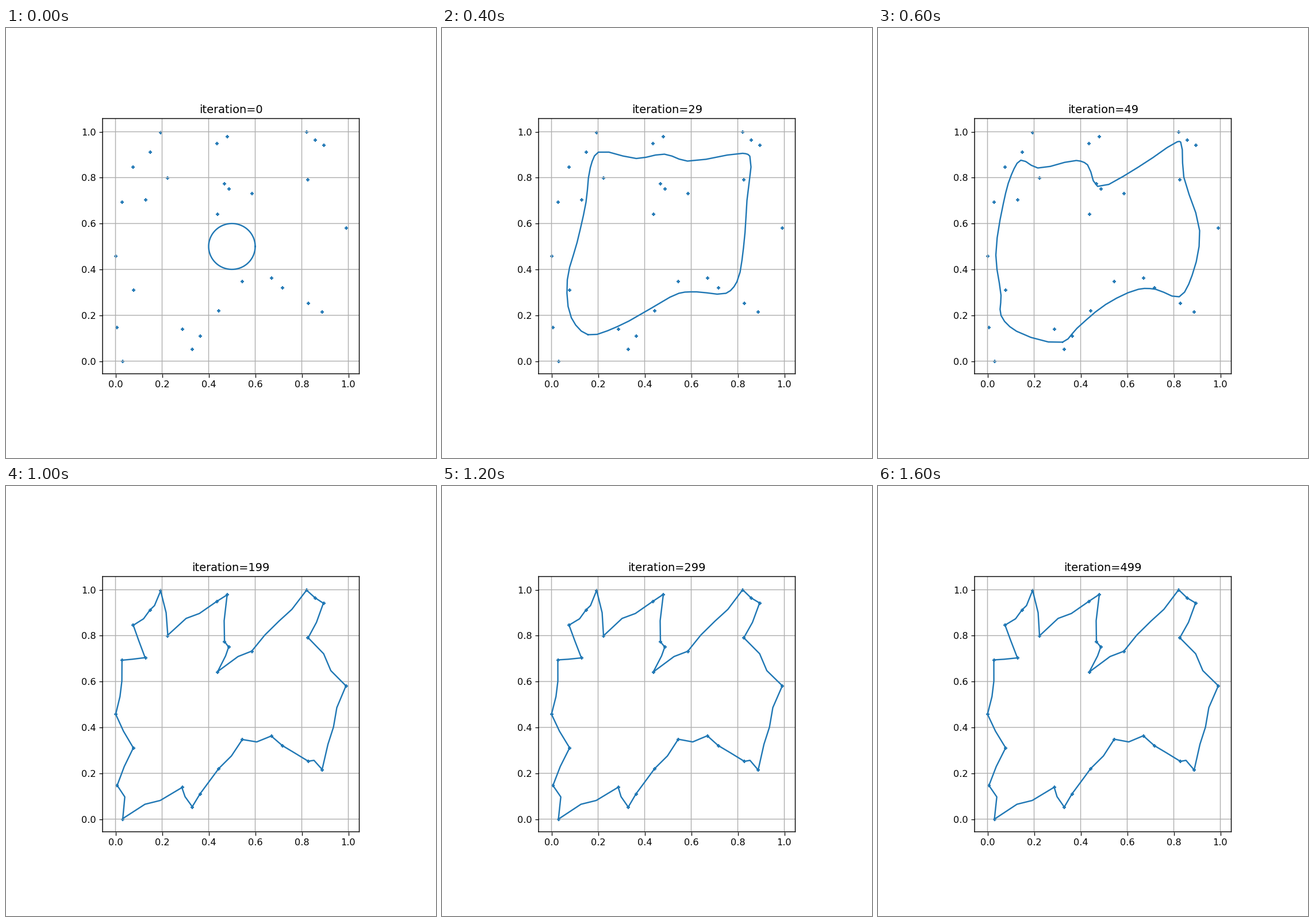
Animation, 748 px wide and 748 px high, one loop 1800 ms. Source, as a matplotlib script:

```python
import numpy as np
import matplotlib.pyplot as plt
from matplotlib.animation import FuncAnimation

SIZE = 748
SCALE = 1.15                        # line scale at 100 dpi
ORIGIN = np.array([190.5, 579.5])   # pixel position of data point (0, 0)
UNIT = np.array([405.0, -399.0])    # pixels per data unit
LEFT, TOP, RIGHT, BOTTOM = 168, 157.5, 614.5, 601.5
SPACING = 56                        # pixels of tour per spare node

plt.rcParams.update({
    "font.family": "DejaVu Sans",
    "font.size": 11.6,
    "lines.linewidth": 1.5 * SCALE,
    "axes.linewidth": 0.9 * SCALE,
    "axes.titlepad": 6 * SCALE,
    "grid.linewidth": 0.9 * SCALE,
})
for axis in ("xtick", "ytick"):
    plt.rcParams[axis + ".major.size"] = 3.5 * SCALE
    plt.rcParams[axis + ".major.width"] = 0.8 * SCALE
    plt.rcParams[axis + ".major.pad"] = 3.5 * SCALE

# Cities in visiting order, in stage pixels
CITIES = np.array([
    (202.5, 579.5), (306.5, 524), (324, 558.5), (337.5, 535.5), (370, 491.5),
    (411, 440.5), (461.5, 434.5), (480.5, 451.5), (526, 479), (550, 494),
    (592, 347.5), (525, 264), (552.5, 203.5), (537.5, 194.5), (523, 180.5),
    (427.5, 287.5), (367.5, 323.5), (387.5, 280), (380, 271), (385, 188.5),
    (367, 200.5), (281, 260.5), (269, 181.5), (250.5, 215.5), (221, 242),
    (242.5, 299), (201.5, 302.5), (190.5, 397), (222, 455.5), (193, 521),
])

# Key points of the net while it is still unfolding
LOOSE = np.array([
    (254, 533.5), (306, 519), (363, 488), (412, 461.5), (443, 459),
    (494, 461.5), (513, 441.5), (524.5, 382), (530.5, 300), (535.5, 223),
    (523, 218), (427, 231.5), (387, 219.5), (338, 227), (272, 216),
    (258, 243), (250.5, 303), (235, 373), (218, 438), (225, 504),
])
TIGHTER = np.array([
    (321, 546.5), (346, 522.5), (396, 481), (453, 454.5), (483, 454.5),
    (524, 467.5), (546.5, 430), (559.5, 352.5), (532, 259.5), (526.5, 198.5),
    (520.5, 198), (452, 242.5), (382, 275.5), (364.5, 238), (345, 230.5),
    (278, 243.5), (248.5, 230), (232, 255.5), (218, 305.5), (205, 395),
    (214, 465), (214, 500), (241, 527.5),
])


def to_data(pixels):
    return (pixels - ORIGIN) / UNIT


def close(points):
    return np.vstack([points, points[:1]])


def circle(radius=0.1, count=75):
    angle = np.linspace(0, 2 * np.pi, count, endpoint=False)
    return 0.5 + radius * np.column_stack([np.cos(angle), np.sin(angle)])


def spline(keys, steps=3):
    """Closed centripetal curve through the key points."""
    after = np.roll(keys, -1, axis=0)
    step = after - keys
    span = np.sqrt(np.hypot(*step.T))[:, None]
    slope = step / span
    span_before = np.roll(span, 1, axis=0)
    tangent = ((slope * span_before + np.roll(slope, 1, axis=0) * span)
               / (span + span_before))
    tangent_after = np.roll(tangent, -1, axis=0)
    t = np.linspace(0, 1, steps, endpoint=False)[:, None, None]
    curve = (keys * (1 + 2 * t) * (1 - t) ** 2
             + after * t ** 2 * (3 - 2 * t)
             + span * (tangent * t * (1 - t) ** 2
                       - tangent_after * t ** 2 * (1 - t)))
    return curve.swapaxes(0, 1).reshape(-1, 2)


def smooth(ring, passes):
    """Average each node with its neighbours around the closed ring."""
    for _ in range(passes):
        ring = sum(weight * np.roll(ring, shift, axis=0)
                   for shift, weight in zip(range(-2, 3), (1, 4, 6, 4, 1))) / 16
    return ring


def tour(lag):
    """Net stretched over the cities; lag holds the city nodes back."""
    nodes, is_city = [], []
    for a, b in zip(CITIES, np.roll(CITIES, -1, axis=0)):
        parts = 1 + round(np.hypot(*(b - a)) / SPACING)
        nodes += [a + (b - a) * i / parts for i in range(parts)]
        is_city += [i == 0 for i in range(parts)]
    ring = smooth(np.array(nodes), 2)
    ring[is_city] = CITIES
    pull = (np.roll(ring, 1, axis=0) + np.roll(ring, -1, axis=0)) / 2 - ring
    ring[is_city] += lag * pull[is_city]
    return to_data(ring)


loose = to_data(spline(LOOSE))
done = tour(0)
STEPS = [
    (0, circle()),
    (9, smooth(loose, 60)),
    (29, loose),
    (49, to_data(spline(TIGHTER))),
    (99, tour(0.28)),
    (199, tour(0.03)),
    (299, done),
    (399, done),
    (499, done),
]

fig = plt.figure(figsize=(SIZE / 100, SIZE / 100), dpi=100, facecolor="white")
ax = fig.add_axes([LEFT / SIZE, 1 - BOTTOM / SIZE,
                   (RIGHT - LEFT) / SIZE, (BOTTOM - TOP) / SIZE])
ax.scatter(*to_data(CITIES).T, s=(4 * SCALE) ** 2, marker="+", color="C0")
net, = ax.plot([], [], color="C0")
ax.grid(True, snap=False)
ax.spines[:].set_snap(False)
ticks = np.linspace(0, 1, 6)
ax.set_xticks(ticks)
ax.set_yticks(ticks)
(x0, y0), (x1, y1) = to_data(np.array([(LEFT, BOTTOM), (RIGHT, TOP)]))
ax.set_xlim(x0, x1)
ax.set_ylim(y0, y1)


def draw(index):
    iteration, points = STEPS[index]
    net.set_data(*close(points).T)
    title = ax.set_title(f"iteration={iteration}")
    return net, title


anim = FuncAnimation(fig, draw, frames=len(STEPS), interval=200, repeat=True)
plt.show()
```
